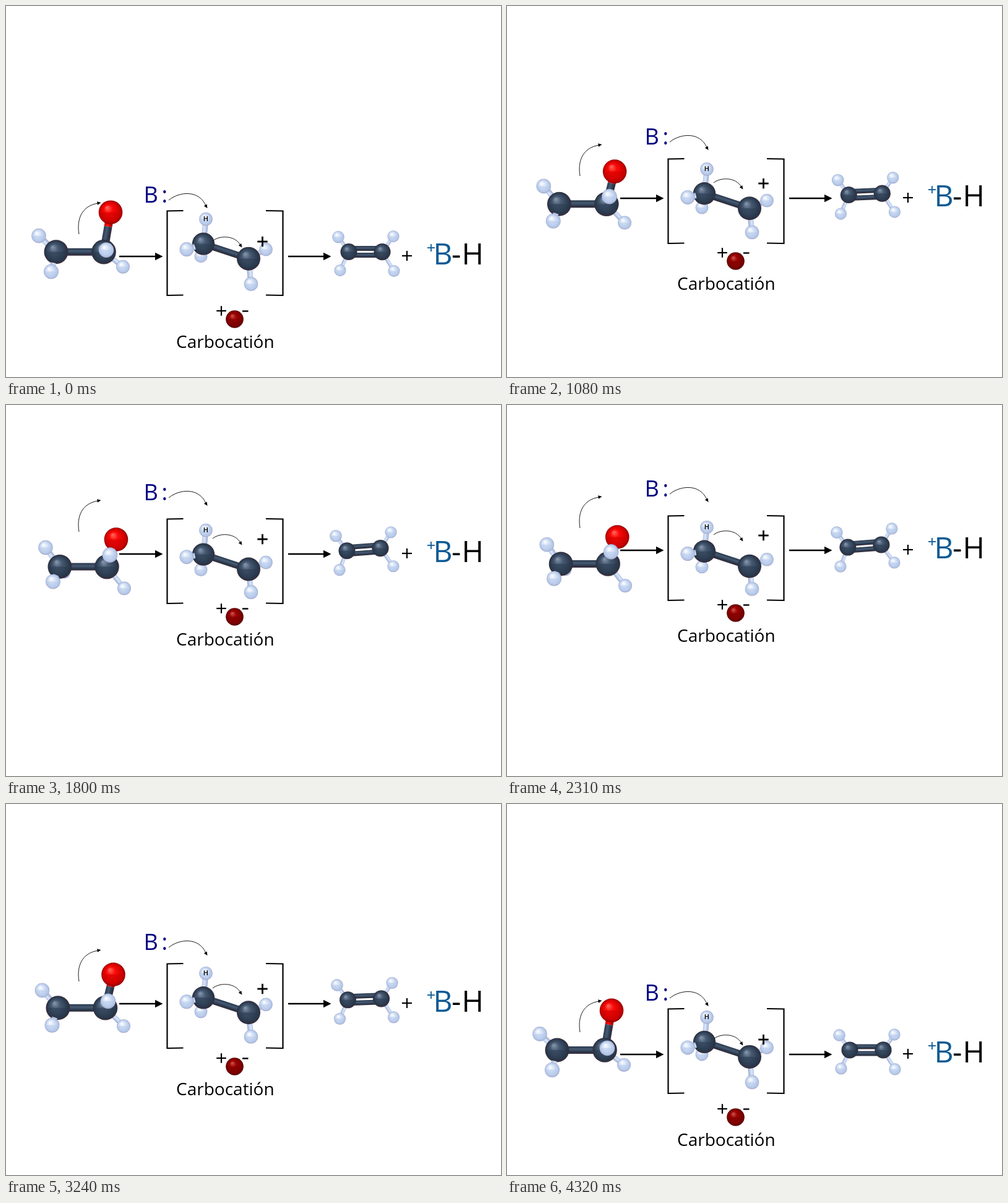
An HTML page with a canvas that plays this animation: 800 by 600 pixels, repeating every 4350 ms.

```html
<!DOCTYPE html>
<html lang="es">
<head>
<meta charset="utf-8">
<title>Carbocatión</title>
<style>
html, body { margin: 0; width: 100%; height: 100%; overflow: hidden; background: #fff; }
canvas { display: block; width: 800px; height: 600px; }
</style>
</head>
<body>
<canvas id="stage" width="800" height="600"></canvas>
<script>
const ctx = document.getElementById('stage').getContext('2d');
const LOOP = 4350, STEP = 30, BASE = 405, HEIGHT = 174, LEAD = 63;
const FONT = '"Open Sans", "Noto Sans", sans-serif';

// Highlight, body, shade, rim
const CARBON = ['#8c9bb0', '#465a72', '#28384c', '#3a2a36'];
const HYDROGEN = ['#ffffff', '#dce7f8', '#b3c7e9', '#a3a6c6'];
const OXYGEN = ['#ff7064', '#fb0a08', '#c80000', '#860000'];
const ION = ['#d05a52', '#9c0403', '#780000', '#4a0000'];

// Each atom: x, y at the low end, x, y near the high end, radius.
// Heights are measured from the reaction arrows.
const alcohol = {
  c1: [81, -7, 87, 21, 19.5], c2: [158, -7, 163, 21, 19.8],
  o: [169, -71, 178, -23, 19.3], front: [162, -10, 168, 2, 12.3],
  low: [189, 17, 191, 56, 11], ul: [53, -33, 64, -10, 11.8],
  ll: [73, 25, 76, 45, 12], back: [89, -5, 95, 31, 9]
};
const cation = {
  c1: [319, -20, 319, 1, 18.2], c2: [392, 4, 392, 25, 19],
  top: [323, -60, 323, -38, 10.8], left: [292, -11, 292, 5, 11.5],
  back: [315, 0, 315, 26, 10.5], right: [420, -11, 420, 14, 10.8],
  low: [396, 45, 396, 62, 11.3]
};
const ethene = {
  c1: [554, -7, 551, -5, 13.5], c2: [608, -7, 605, -9, 13.6],
  ul: [537, -31, 533, -29, 9.8], ur: [626, -32, 622, -35, 9.6],
  ll: [540, 23, 539, 26, 9.6], lr: [627, 24, 626, 20, 9.6]
};

const mix = (a, b, u) => a + (b - a) * u;
const smooth = x => x * x * (3 - 2 * x);

function pose(molecule, u, y) {
  const out = {};
  for (const [name, a] of Object.entries(molecule))
    out[name] = { x: mix(a[0], a[2], u), y: y + mix(a[1], a[3], u), r: a[4] };
  return out;
}

function line(x1, y1, x2, y2, width, color = '#000') {
  ctx.strokeStyle = color;
  ctx.lineWidth = width;
  ctx.beginPath();
  ctx.moveTo(x1, y1);
  ctx.lineTo(x2, y2);
  ctx.stroke();
}

function ball({ x, y, r }, [shine, body, shade, rim]) {
  const g = ctx.createRadialGradient(x - r * 0.3, y - r * 0.42, 0, x, y, r);
  g.addColorStop(0, shine);
  g.addColorStop(0.36, body);
  g.addColorStop(0.86, shade);
  g.addColorStop(1, rim);
  ctx.fillStyle = g;
  ctx.beginPath();
  ctx.arc(x, y, r, 0, Math.PI * 2);
  ctx.fill();
  // Darker lower half, as if a horizon were reflected
  const h = ctx.createLinearGradient(0, y, 0, y + r);
  h.addColorStop(0, shade + '80');
  h.addColorStop(1, shade + '00');
  ctx.fillStyle = h;
  ctx.beginPath();
  ctx.arc(x, y, r * 0.97, 0, Math.PI);
  ctx.fill();
}

// Stick from a to b, between the fractions from and to of its length
function stick(a, b, width, [, body, shade, rim], from = 0, to = 1, shift = 0) {
  const dx = b.x - a.x, dy = b.y - a.y, len = Math.hypot(dx, dy) || 1;
  const nx = -dy / len, ny = dx / len;
  const x1 = a.x + dx * from + nx * shift, y1 = a.y + dy * from + ny * shift;
  const x2 = a.x + dx * to + nx * shift, y2 = a.y + dy * to + ny * shift;
  const w = width / 2;
  const g = ctx.createLinearGradient(x1 - nx * w, y1 - ny * w, x1 + nx * w, y1 + ny * w);
  g.addColorStop(0, shade);
  g.addColorStop(0.4, body);
  g.addColorStop(0.75, shade);
  g.addColorStop(1, rim);
  line(x1, y1, x2, y2, width, g);
}

const bondH = (c, h, width, from = 0) => stick(c, h, width, HYDROGEN, from);

function drawAlcohol(m) {
  ball(m.back, HYDROGEN);
  bondH(m.c2, m.low, 8);
  ball(m.low, HYDROGEN);
  stick(m.c2, m.o, 13, CARBON, 0, 0.64);
  stick(m.c2, m.o, 13, OXYGEN, 0.64, 1);
  ball(m.o, OXYGEN);
  bondH(m.c1, m.ul, 9);
  stick(m.c1, m.c2, 12, CARBON);
  ball(m.c1, CARBON);
  ball(m.c2, CARBON);
  ball(m.ul, HYDROGEN);
  bondH(m.c1, m.ll, 9, 0.55);
  ball(m.ll, HYDROGEN);
  ball(m.front, HYDROGEN);
}

function drawCation(m) {
  bondH(m.c1, m.back, 8);
  ball(m.back, HYDROGEN);
  bondH(m.c2, m.right, 8);
  ball(m.right, HYDROGEN);
  bondH(m.c1, m.top, 9);
  bondH(m.c2, m.low, 9);
  stick(m.c1, m.c2, 11, CARBON);
  ball(m.c1, CARBON);
  ball(m.c2, CARBON);
  bondH(m.c1, m.left, 9, 0.5);
  ball(m.top, HYDROGEN);
  ball(m.left, HYDROGEN);
  ball(m.low, HYDROGEN);
  text('H', m.top.x, m.top.y + 3, 11, '#000', 'center', 600);
}

function drawEthene(m) {
  bondH(m.c1, m.ul, 6);
  bondH(m.c1, m.ll, 6);
  bondH(m.c2, m.ur, 6);
  bondH(m.c2, m.lr, 6);
  stick(m.c1, m.c2, 8, CARBON, 0, 1, -5.5);
  stick(m.c1, m.c2, 8, CARBON, 0, 1, 5.5);
  ball(m.c1, CARBON);
  ball(m.c2, CARBON);
  for (const h of [m.ul, m.ur, m.ll, m.lr]) ball(h, HYDROGEN);
}

function text(s, x, y, size, color = '#000', align = 'left', weight = 400) {
  ctx.font = `${weight} ${size}px ${FONT}`;
  ctx.textAlign = align;
  ctx.fillStyle = color;
  ctx.fillText(s, x, y);
}

function plus(x, y, r, width, color) {
  line(x - r, y, x + r, y, width, color);
  line(x, y - r, x, y + r, width, color);
}

function tip(x, y, angle, length, half) {
  ctx.save();
  ctx.translate(x, y);
  ctx.rotate(angle);
  ctx.fillStyle = '#000';
  ctx.beginPath();
  ctx.moveTo(0, 0);
  ctx.lineTo(-length, -half);
  ctx.lineTo(-length, half);
  ctx.fill();
  ctx.restore();
}

function arrow(x1, x2, y) {
  line(x1, y, x2 - 10, y, 2.6);
  tip(x2, y, 0, 12.5, 6.3);
}

function curve(x, y, c, end, angle) {
  ctx.strokeStyle = '#000';
  ctx.lineWidth = 0.9;
  ctx.beginPath();
  ctx.moveTo(x, y);
  ctx.bezierCurveTo(...c);
  ctx.stroke();
  tip(...end, angle, 6, 2.8);
}

function bracket(x, inner, top) {
  ctx.strokeStyle = '#000';
  ctx.lineWidth = 2.2;
  ctx.beginPath();
  ctx.moveTo(inner, top);
  ctx.lineTo(x, top + 0.5);
  ctx.lineTo(x, top + 137);
  ctx.lineTo(inner, top + 136.5);
  ctx.stroke();
}

function drawSigns() {
  arrow(183, 253.5, 0);
  arrow(456, 525.5, 0);
  curve(118, -36, [114, -60, 122, -82, 149, -86], [153.5, -87], -0.15);
  curve(263, -91, [280, -105, 312, -108, 323, -82], [325.5, -78], 1);
  curve(334, -25, [344, -34, 370, -35, 379, -18], [381.5, -14.5], 0.95);
  text('B', 222.5, -87, 36, '#000080');
  text(':', 251.5, -87, 36, '#000080');
  plus(414.5, -24, 8.2, 2.8);
  plus(348, 88, 7.8, 2.2);
  line(382, 88.5, 391.5, 88.5, 2.4);
  ball({ x: 369.5, y: 101.5, r: 14.3 }, ION);
  text('Carbocatión', 275, 148, 28);
  plus(648, -1, 8, 2.2);
  plus(687, -14, 6, 1.8, '#0d5a94');
  text('B', 690.5, 13, 48, '#0d5a94');
  text('-', 720, 13, 48);
  text('H', 736.5, 13, 48);
}

function draw(ms) {
  const t = Math.floor((ms % LOOP) / STEP) * STEP;
  const phase = ((t + LEAD) % LOOP) / LOOP * 2;
  const rise = HEIGHT * smooth(phase < 1 ? phase : 2 - phase);
  const u = rise / 165, y = BASE - rise;
  ctx.fillStyle = '#fff';
  ctx.fillRect(0, 0, 800, 600);
  drawAlcohol(pose(alcohol, u, y));
  drawCation(pose(cation, u, y));
  drawEthene(pose(ethene, u, y));
  const top = Math.round(y - 73.5 + 17 * u);
  bracket(260.5, 286.5, top);
  bracket(447.5, 420, top);
  ctx.save();
  ctx.translate(0, Math.round(y));
  drawSigns();
  ctx.restore();
}

const start = performance.now();
function tick() {
  draw(performance.now() - start);
  requestAnimationFrame(tick);
}
tick();
</script>
</body>
</html>
```
